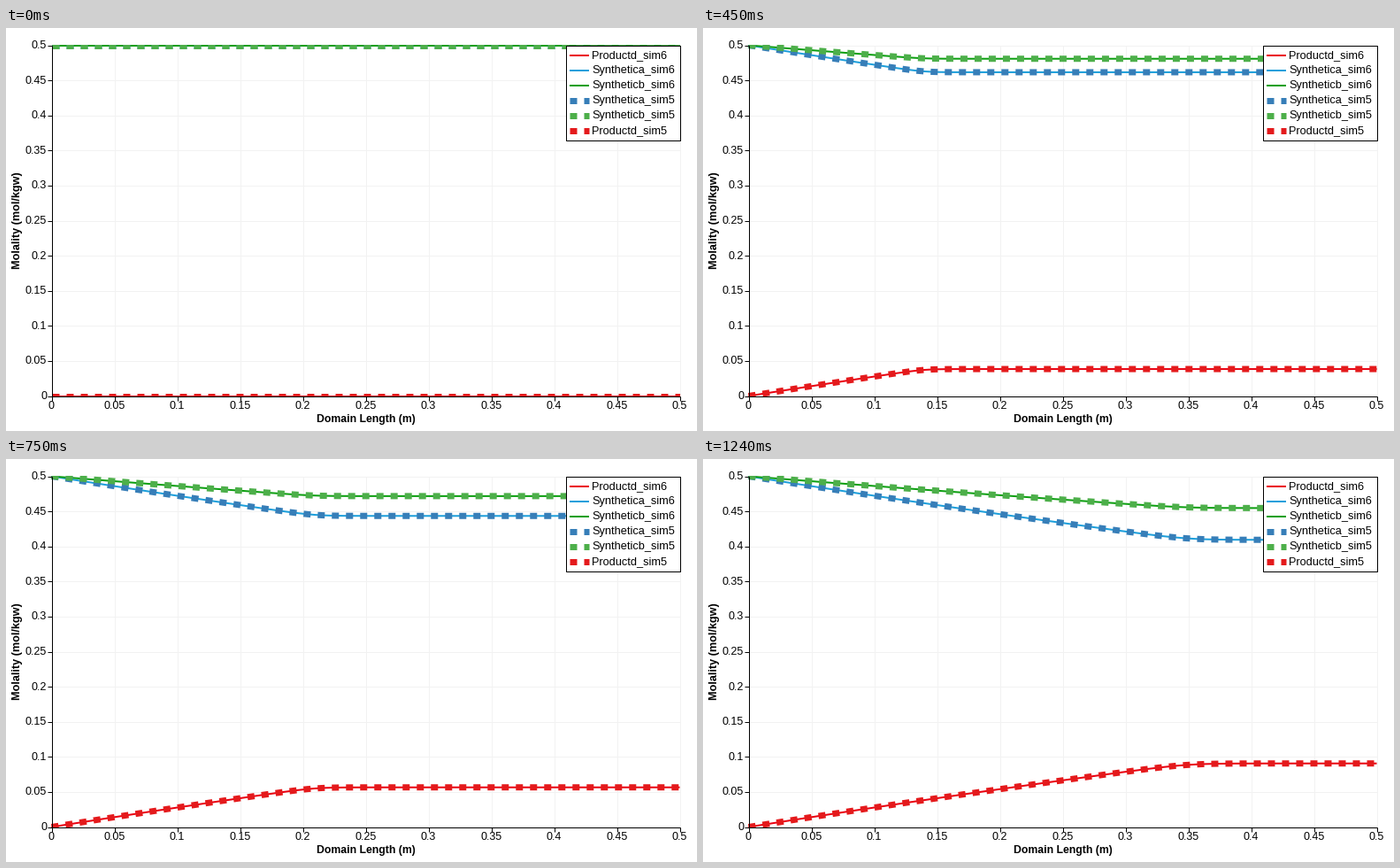
These frames come from a looping animation (781x455 px, 1.36 s). A matplotlib script:

```python
import numpy as np
import matplotlib.pyplot as plt
from matplotlib.animation import FuncAnimation
from matplotlib.patches import Rectangle

W, H, DPI = 781, 455, 64
PX = 72 / DPI                       # points per pixel
LEFT, RIGHT, TOP, BOTTOM = 51.5, 761.5, 19.5, 415.5
VMAX = 0.5
TICK_MS = 10
HOLDS = [300, 150, 300, 160, 150, 300]
STEP_ENDS = np.cumsum(HOLDS)

C0 = 0.5                            # inflow concentration
DECAY = 0.04                        # first-order decay per step
SPEED = 0.07                        # front advance per step

plt.rcParams["font.family"] = "Liberation Sans"
fig = plt.figure(figsize=(W / DPI, H / DPI), dpi=DPI, facecolor="white")
ax = fig.add_axes([0, 0, 1, 1])
ax.set_xlim(0, W)
ax.set_ylim(H, 0)
ax.axis("off")


def to_x(v):
    return LEFT + (RIGHT - LEFT) * v / VMAX


def to_y(v):
    return BOTTOM - (BOTTOM - TOP) * v / VMAX


def stroke(xs, ys, color, width=1, z=1, dashed=False):
    style = (0, (8 / width, 8 / width)) if dashed else "-"
    line, = ax.plot(xs, ys, color=color, lw=width * PX, ls=style, zorder=z,
                    solid_capstyle="butt", dash_capstyle="butt")
    return line


def label(x, y, text, size=12.5, z=5, **kw):
    kw.setdefault("va", "baseline")
    return ax.text(x, y, text, fontsize=size * PX, color="black", zorder=z, **kw)


def draw_axes():
    for v in np.linspace(0, VMAX, 11):
        x, y = to_x(v), to_y(v)
        stroke([x, x], [TOP, BOTTOM], "#f2f2f2", z=0)
        stroke([LEFT, RIGHT], [y, y], "#f2f2f2", z=0)
        stroke([x, x], [BOTTOM, BOTTOM + 5], "black", z=4)
        stroke([LEFT - 5, LEFT], [y, y], "black", z=4)
        label(x, 430.5, f"{v:.2g}", ha="center")
        label(46, y + 3.5, f"{v:.2g}", ha="right")
    stroke([LEFT, LEFT], [TOP, BOTTOM], "black", z=4)
    stroke([LEFT, RIGHT], [BOTTOM, BOTTOM], "black", z=4)
    label(406.5, 445, "Domain Length (m)", 12.3, ha="center", weight="bold")
    label(13, 217, "Molality (mol/kgw)", 12.6, ha="center", va="center",
          rotation=90, weight="bold")


# name, colour, dashed, start value, share of the converted amount
SERIES = [
    ("Productd_sim6", "#ea0010", False, 0, 1),
    ("Synthetica_sim6", "#1c9fdb", False, C0, -1),
    ("Syntheticb_sim6", "#0c9f10", False, C0, -0.5),
    ("Synthetica_sim5", "#377eb8", True, C0, -1),
    ("Syntheticb_sim5", "#4daf4a", True, C0, -0.5),
    ("Productd_sim5", "#e41a1c", True, 0, 1),
]


def draw_legend():
    ax.add_patch(Rectangle((632.5, 19.5), 129, 107, fc="white", ec="black",
                           lw=PX, zorder=6))
    for i, (name, color, dashed, _, _) in enumerate(SERIES):
        y = 30.5 + 17 * i
        stroke([637, 659], [y, y], color, 7 if dashed else 2, 7, dashed)
        label(662, y + 3.5, name, 12.7, z=8)


def converted(x, step):
    """Converted amount along the domain, behind a front that spreads out."""
    if step == 0:
        return np.zeros_like(x)
    spread = 0.004 * step ** 0.7
    reach = x - spread * np.logaddexp(0, (x - SPEED * step) / spread)
    return C0 * (1 - np.exp(-DECAY / SPEED * reach))


draw_axes()
draw_legend()

domain = np.linspace(0, VMAX, 251)
plot_area = Rectangle((LEFT - 0.5, TOP - 0.5), RIGHT - LEFT + 1,
                      BOTTOM - TOP + 1, transform=ax.transData)
curves = []
for _, color, dashed, start, share in SERIES:
    curve = stroke(to_x(domain), to_y(start + 0 * domain), color,
                   7 if dashed else 2, 2, dashed)
    curve.set_clip_path(plot_area)
    curves.append(curve)


def update(frame):
    step = int(np.searchsorted(STEP_ENDS, frame * TICK_MS, side="right"))
    amount = converted(domain, step)
    for curve, (_, _, _, start, share) in zip(curves, SERIES):
        curve.set_ydata(to_y(start + share * amount))
    return curves


anim = FuncAnimation(fig, update, frames=sum(HOLDS) // TICK_MS,
                     interval=TICK_MS, repeat=True, repeat_delay=0)
plt.show()
```
